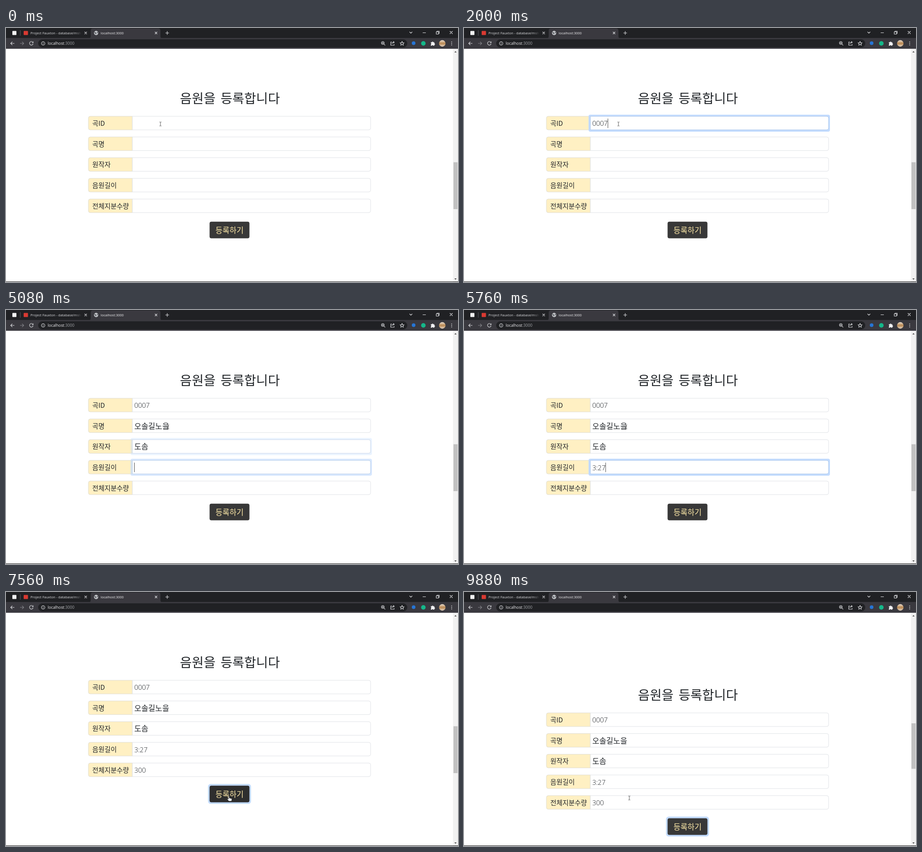
Recreate the animation shown at these times as an HTML page. Size 998 by 561 pixels, loop 9.92 s.

```html
<!DOCTYPE html>
<html lang="ko">
<head>
<meta charset="utf-8">
<title>음원 등록</title>
<style>
html, body { margin: 0; width: 100%; height: 100%; overflow: hidden; background: #fff; }
svg { display: block; width: 100vw; height: 100vh; }
text { font-family: "Noto Sans CJK KR", "Noto Sans CJK", sans-serif; font-weight: 350; fill: #212529; white-space: pre; }
.ui text { font: 7.56px "Open Sans", sans-serif; fill: #dcdde0; }
.ui .url { font-size: 8.75px; fill: #f1f1f3; }
.line { fill: none; stroke: #dfe0e3; stroke-width: 1.1; }
.latin { font: 15px "Open Sans", sans-serif; font-weight: 350; }
.hangul { font-size: 16.8px; }
</style>
</head>
<body>
<svg viewBox="0 0 998 561">
  <defs>
    <linearGradient id="fade" gradientUnits="userSpaceOnUse" x1="152" x2="167">
      <stop stop-color="#dcdde0"/><stop offset="1" stop-color="#dcdde0" stop-opacity="0"/>
    </linearGradient>
    <linearGradient id="avatar" x2="0" y2="1">
      <stop stop-color="#e9dfd2"/><stop offset=".5" stop-color="#b98750"/><stop offset="1" stop-color="#e3d5c5"/>
    </linearGradient>
  </defs>

  <rect width="998" height="561" fill="#fff"/>
  <g id="alert">
    <rect x="170" y="139.7" width="647" height="56.6" rx="4" fill="#d1e7dd" stroke="#badbcc"/>
    <text class="hangul" x="187" y="174.8" style="fill:#0f5132;word-spacing:2px">음원등록에 성공했습니다!</text>
  </g>
  <g id="form">
    <text x="384" y="166" font-size="28.5" word-spacing="3">음원을 등록합니다</text>
    <g id="rows"></g>
    <g id="popup">
      <rect x="281" y="411" width="119" height="30" rx="2" fill="#292a2d"/>
      <text x="289" y="428" font-size="7" style="fill:#fff">300</text>
    </g>
    <rect id="buttonRing" x="446" y="424" width="95" height="44" rx="6" fill="#c2dbfe"/>
    <rect id="button" x="449.5" y="427.7" width="88" height="36.8" rx="4"/>
    <text x="493.5" y="452.8" font-size="16.9" text-anchor="middle" style="fill:#ffe9a8">등록하기</text>
  </g>

  <rect x="987" y="46" width="11" height="514" fill="#f1f1f1"/>
  <path d="M990 54l2.5-3 2.5 3zM990 553l2.5 3 2.5-3z" fill="#505050"/>
  <rect id="thumb" x="988" width="9" fill="#c1c1c1"/>
  <rect y="560" width="998" height="1" fill="#111"/>

  <g class="ui">
    <rect width="998" height="23" fill="#202124"/>
    <path d="M182 23q5 0 5-5V6q0-5 5-5H336q5 0 5 5v12q0 5 5 5z" fill="#3a393f"/>
    <rect y="22" width="998" height="24" fill="#3a393f"/>
    <rect y="45" width="998" height="1" fill="#504f56"/>
    <rect x="71" y="25" width="815" height="18" rx="9" fill="#202124"/>
    <rect x="14" y="6.5" width="9" height="9" rx="1" fill="#f2f2f2"/>
    <path class="line" d="M31.5 5v12" style="stroke:#55565b"/>
    <rect x="39" y="6.5" width="9.5" height="9" rx="1" fill="#d93a32"/>
    <text x="54" y="13.5" style="fill:url(#fade)">Project Fauxton - database/msh</text>
    <circle cx="199" cy="11" r="4.7" fill="#c8cace"/>
    <path d="M195 9q3-1 3 1l2 1-1 3q-3-1-4-5M200 7q0 2 3 2v3l-2-1" fill="#62656a"/>
    <text x="209" y="13.5" style="fill:#f1f1f3">localhost:3000</text>
    <path class="line" d="M173.5 8.5l5 5m0-5l-5 5M328.8 8.5l5 5m0-5l-5 5M352 11h8m-4-4v8"/>
    <path class="line" d="M891 8.5l3 3 3-3M920 10.5h7M950 8.5h5v5h-5zM951.5 8.3V7h5v5h-1.3M980 7l6 6m0-6l-6 6"/>

    <path class="line" d="M18.5 34h-8m3.5-3.7L10.3 34l3.7 3.7"/>
    <path class="line" d="M31 34h8m-3.5-3.7l3.7 3.7-3.7 3.7" style="stroke:#85868b"/>
    <path class="line" d="M59 31.2a4 4 0 1 0 .8 3.8M60 29.8v3h-3"/>
    <circle class="line" cx="82" cy="34" r="3.8"/>
    <path class="line" d="M82 33.5v2.6M82 31.5v1"/>
    <text class="url" x="92" y="37.2">localhost<tspan fill="#a4a6aa">:3000</tspan></text>

    <circle class="line" cx="832" cy="33" r="3"/>
    <path class="line" d="M834.3 35.3l3 3M830.5 33h3m-1.5-1.5v3"/>
    <path class="line" d="M852 31h-2.5v7h7.5v-2.5M852 35q0-3.5 5-3.5m-2-2l2.2 2-2.2 2"/>
    <path class="line" d="M874.5 29.8l1.3 2.8 3 .3-2.2 2 .7 3-2.8-1.6-2.8 1.6.7-3-2.2-2 3-.3z"/>
    <circle cx="900" cy="33.5" r="4" fill="#2675d5"/>
    <circle cx="921.5" cy="34" r="5" fill="#15b88a"/>
    <path d="M938 31.5h2.4a1.5 1.5 0 1 1 3 0h2.4v2.4a1.5 1.5 0 1 1 0 3v2.1h-2.5a1.6 1.6 0 0 0-3 0H938v-2.5a1.6 1.6 0 0 0 0-3z" fill="#f1f1f3"/>
    <circle cx="963.3" cy="34" r="7.2" fill="url(#avatar)"/>
    <path d="M984 30.6v.01M984 34v.01M984 37.4v.01" stroke="#e6e6e8" stroke-width="1.8" stroke-linecap="round"/>
  </g>

  <g id="mouse">
    <path id="beam" d="M-2.2-4.3H-.6L0-3.7.6-4.3H2.2M0-3.7V3.7M-2.2 4.3H-.6L0 3.7.6 4.3H2.2" fill="none" stroke="#444" stroke-width=".9"/>
    <path id="arrow" d="M0 0v11l2.6-2.3 1.6 3.7 1.5-.6-1.6-3.7H7.7z" fill="#fff" stroke="#111" stroke-width=".7"/>
    <path id="hand" d="M-1 0q1-1.3 2 0v4l5 1.2q1 .3.8 1.5L6 11H0L-3.5 6.5q0-1.5 1.2-1L-1 6.7z" fill="#fff" stroke="#111" stroke-width=".7"/>
  </g>
</svg>

<script>
const LOOP = 9920, SUBMIT = 7400, DONE = 8640;
const $ = id => document.getElementById(id);
const clamp = v => Math.max(0, Math.min(1, v));
const ease = v => (v = clamp(v), v * v * (3 - 2 * v));
const rowY = i => 195 + 45.7 * i;

// keys: [time, field content from then on]
const fields = [
  { label: "곡ID", on: 480, off: 2560,
    keys: [[840, "0"], [1040, "00"], [1200, "000"], [1640, "0007"]] },
  { label: "곡명", on: 2560, off: 4480,
    keys: [[3320, "d"], [3480, "dh"], [3680, "d"], [3760, ""], [3880, "오"], [4000, "오솔"],
      [4120, "오솔길"], [4240, "오솔길노"], [4360, "오솔길노을"]] },
  { label: "원작자", on: 4480, off: 4990, keys: [[4640, "도"], [4840, "도솜"]] },
  { label: "음원길이", on: 4990, off: 5880,
    keys: [[5320, "3"], [5480, "3:"], [5600, "3:2"], [5720, "3:27"]] },
  { label: "전체지분수량", on: 5880, off: SUBMIT, keys: [[6160, "3"], [6280, "30"], [6400, "300"]] }
];

$("rows").innerHTML = fields.map(({ label }, i) => {
  const y = rowY(i);
  return `<path d="M279 ${y}H186q-4 0-4 4v22q0 4 4 4h93z" fill="#fff0c3" stroke="#dfdcd0"/>
    <text x="190.5" y="${y + 20.9}" font-size="14.7">${label}</text>
    <rect class="ring" x="275" y="${y - 3.6}" width="533" height="37.6" rx="4" fill="#c2dbfe"/>
    <path class="box" d="M279 ${y}H801q4 0 4 4v22q0 4-4 4H279z" fill="#fff" stroke="#dfe2e6"/>
    <path class="box focus" d="M279 ${y}H801q4 0 4 4v22q0 4-4 4H279z" fill="none" stroke="#a5c8f6"/>
    <text class="value" x="283.2"></text>
    <path class="caret" stroke="#333" stroke-width=".9"/>`;
}).join("");
const parts = name => [...document.querySelectorAll("." + name)];
const rings = parts("ring"), edges = parts("focus"), values = parts("value"), carets = parts("caret");

const moves = [
  [2080, 2360, 341, 212, 358, 258],
  [6640, 7080, 358, 258, 492, 451],
  [9000, 9640, 492, 451, 365, 455]
];

function mouseAt(t) {
  let x = 341, y = 212;
  for (const [from, to, x0, y0, x1, y1] of moves) {
    if (t < from) break;
    const k = ease((t - from) / (to - from));
    x = x0 + (x1 - x0) * k;
    y = y0 + (y1 - y0) * k;
  }
  return [x, y];
}

function drawField({ on, off, keys }, i, t) {
  const glow = ease((t - on) / 150) * (1 - ease((t - off) / 150));
  rings[i].style.opacity = edges[i].style.opacity = glow;

  let content = "", last = on;
  for (const [time, text] of keys) if (t >= time) [last, content] = [time, text];
  const korean = /[가-힣]/.test(content), value = values[i];
  value.setAttribute("class", "value " + (korean ? "hangul" : "latin"));
  value.setAttribute("y", rowY(i) + (korean ? 22 : 21.4));
  if (value.textContent !== content) value.textContent = content;

  const visible = t >= on && t < off && (t - last) % 1060 < 530;
  const x = 283.5 + (content ? value.getComputedTextLength() : 0);
  carets[i].setAttribute("d", visible ? `M${x} ${rowY(i) + 5}v21` : "");
}

function draw(t) {
  const done = t >= DONE, shift = done ? 72 : 0;
  fields.forEach((field, i) => drawField(field, i, t));
  $("form").setAttribute("transform", `translate(0 ${shift})`);
  $("alert").style.opacity = done ? 0.87 * clamp(1 - (t - DONE) / 1000) : 0;
  $("popup").style.opacity = t < 6200 ? 0 : clamp((6535 - t) / 135);
  $("buttonRing").style.opacity = ease((t - SUBMIT) / 150);
  $("thumb").setAttribute("y", done ? 290 : 296.5);
  $("thumb").setAttribute("height", done ? 100.5 : 103.5);

  const [x, y] = mouseAt(t), localY = y - shift;
  const onButton = x > 449 && x < 538 && localY > 427 && localY < 465;
  const onField = fields.some((f, i) => localY >= rowY(i) - 1 && localY <= rowY(i) + 31);
  $("button").setAttribute("fill", onButton ? "#2e2e2e" : "#383838");
  $("mouse").setAttribute("transform", `translate(${x} ${y})`);
  const shape = onButton ? "hand" : onField ? "beam" : "arrow";
  for (const id of ["hand", "beam", "arrow"]) $(id).style.display = id === shape ? "" : "none";
}

const start = performance.now();
function tick() {
  draw((performance.now() - start) % LOOP);
  requestAnimationFrame(tick);
}
tick();
</script>
</body>
</html>
```
